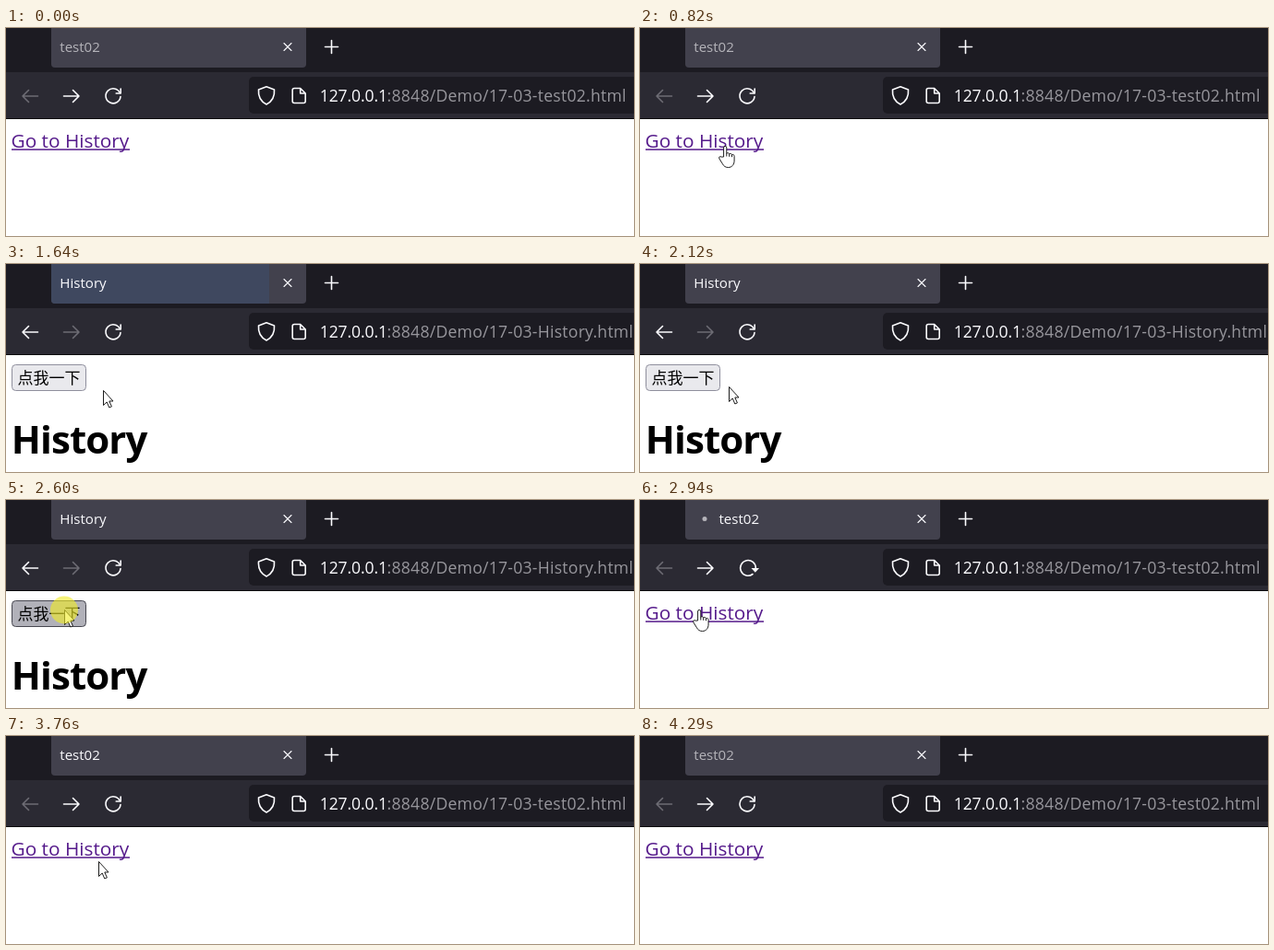
Recreate the animation shown at these times as an HTML page. Size 680 by 226 pixels, loop 4360 ms.

```html
<!DOCTYPE html>
<html lang="en">
<head>
<meta charset="utf-8">
<title>History back and forward</title>
<style>
  html, body { margin: 0; width: 100%; height: 100%; overflow: hidden; background: #fff; }
  svg { display: block; width: 680px; height: 226px; }
  text { font-family: "Open Sans", "Noto Sans", sans-serif; white-space: pre; }
  .icon { fill: none; stroke: #fbfbfe; stroke-width: 1.6; stroke-linecap: round; stroke-linejoin: round; }
  .thin { stroke-width: 1.1; }
  .url { font-size: 17.6px; }
  .cursor { fill: #fff; stroke: #111; stroke-width: .95; stroke-linejoin: round; }
</style>
</head>
<body>
<svg viewBox="0 0 680 226">
  <defs>
    <clipPath id="tabShape"><rect x="49" y="-6" width="276" height="49" rx="4"/></clipPath>
  </defs>

  <rect width="680" height="226" fill="#fff"/>
  <rect width="680" height="48" fill="#1c1b22"/>
  <rect y="48" width="680" height="50" fill="#2b2a33"/>
  <rect y="98" width="680" height="1" fill="#0c0c0d"/>

  <g clip-path="url(#tabShape)">
    <rect x="49" width="276" height="43" fill="#42414d"/>
    <rect id="burst" x="49" width="0" height="43" fill="#3f485f"/>
  </g>
  <circle id="dot" cy="20.5" r="2.5" fill="#b5b4ba"/>
  <text id="tabText" y="26" font-size="15.1" font-weight="500"></text>
  <path class="icon thin" d="M301 16.500l8 8m0-8l-8 8"/>
  <path class="icon" d="M345.500 20.500h14m-7-7v14"/>

  <path id="back" class="icon" d="M34.500 74H18m6.500-6.500L18 74l6.500 6.500"/>
  <path id="forward" class="icon" d="M62.500 74H79m-6.500-6.500L79 74l-6.500 6.500"/>
  <g id="reload">
    <path class="icon" d="M123.300 70.500A8 8 0 1 0 124 74.500"/>
    <path class="icon" d="M124.200 66v5h-5"/>
  </g>
  <g id="reloadTurn">
    <path class="icon" d="M122 80.500A8.300 8.300 0 1 1 125.300 74"/>
    <path d="M120.500 74h8.500l-4.200 4.800z" fill="#fbfbfe"/>
  </g>
  <path id="stop" class="icon" d="M110 68l12 12m0-12l-12 12"/>

  <rect x="263" y="53" width="430" height="40" rx="5" fill="#1c1b22"/>
  <path class="icon" d="M282 63.800l8.500 3.200c.6 7-1.800 12.500-8.500 16c-6.700-3.500-9.100-9-8.500-16z"/>
  <path class="icon" d="M312.200 65.500h6.500l5.500 5.500v8.500a2 2 0 0 1-2 2h-10a2 2 0 0 1-2-2v-12a2 2 0 0 1 2-2zM318.700 66v5h5"/>
  <text class="url" x="339.800" y="80" fill="#fbfbfe" letter-spacing="-.15">127.0.0.1</text>
  <text id="path" class="url" x="412.600" y="80" fill="#97969c" letter-spacing=".24"></text>

  <g id="linkPage" fill="#551a8b">
    <text x="5.500" y="130" font-size="20.8">Go to History</text>
    <rect x="6" y="131.300" width="128" height="1.500"/>
  </g>
  <g id="historyPage">
    <rect id="button" x="6.500" y="109.500" width="80" height="28" rx="4" stroke="#8f8f9d"/>
    <text x="12.500" y="130" font-size="17" lang="zh-CN"
      style="font-family:'Noto Sans CJK SC','Noto Sans CJK',sans-serif">点我一下</text>
    <text x="5.800" y="206.300" font-size="42" font-weight="700" letter-spacing="-.9">History</text>
  </g>

  <path id="arrow" class="cursor" d="M.5.500V16.500L4.200 13l2.600 6l2.600-1.100L6.800 12h4.200z"/>
  <g id="hand" class="cursor">
    <path d="M-.4 12V2a1.600 1.600 0 0 1 3.200 0v6.200c.7-.8 2.500-.6 2.900.6c.8-.7 2.400-.4 2.800.8c1-.5 2.600 0 2.600 1.700v4.700c0 4.500-2.600 7.500-6.600 7.500c-3 0-4.600-1.300-6-3.700l-3.600-5.800c-1-1.900.9-3 2.200-1.900z"/>
    <path d="M2.800 8v3.500M5.700 9v2.800M8.500 9.800v2.400" fill="none"/>
  </g>
  <circle id="press" r="15" fill="#f0eb28" fill-opacity=".62"/>
</svg>
<script>
const LOOP = 4360, STEP = 70;
const el = {};
document.querySelectorAll("[id]").forEach(n => el[n.id] = n);
const set = (id, attrs) => { for (const k in attrs) el[id].setAttribute(k, attrs[k]); };
const show = (id, on) => set(id, { visibility: on ? "visible" : "hidden" });

const linear = u => u;
const easeOut = u => 1 - (1 - u) ** 2;
const easeBoth = u => u * u * (3 - 2 * u);

// start time, number of steps, from, to, easing
const moves = [
  [260, 8, [184, 205], [91, 129], easeOut],
  [820, 1, [91, 128], [91, 128], linear],
  [1290, 2, [91, 128], [91, 126], linear],
  [1430, 4, [95, 129], [105, 137], linear],
  [2050, 6, [100, 135], [63, 119], easeBoth],
  [3300, 3, [64, 120], [67, 123], linear],
  [3760, 1, [100, 136], [100, 136], linear]
];

function pointer(t) {
  if (t < 260 || t >= 3830) return null;
  const [start, n, a, b, ease] = moves.filter(m => m[0] <= t).pop();
  const k = Math.min(n - 1, Math.floor((t - start + 10) / STEP));
  const u = n > 1 ? ease(k / (n - 1)) : 1;
  return a.map((v, i) => Math.round(v + (b[i] - v) * u));
}

function burstWidth(t) {
  if (t >= 1500 && t < 1850) return t < 1570 ? 80 : t < 1640 ? 160 : 236;
  return t >= 3010 && t < 3160 ? 208 : 0;
}

function dotX(t) {
  if (t >= 1290 && t < 1500) return t < 1370 ? 66 : t < 1430 ? 61 : 70;
  return t >= 2870 && t < 3010 ? (t < 2940 ? 61 : 70) : 0;
}

function draw(t) {
  const onHistory = t >= 1290 && t < 2870;
  const historyShown = t >= 1430 && t < 2940;
  const pressed = t >= 1220 && t < 1290 || t >= 2600 && t < 2800;
  const stopping = t >= 1290 && t < 1370 || t >= 2870 && t < 2940;
  const turning = t >= 1370 && t < 1430 || t >= 2940 && t < 3010;
  const dot = dotX(t), p = pointer(t);

  el.tabText.textContent = onHistory ? "History" : "test02";
  set("tabText", { x: dot ? 85.5 : 58.3, fill: t >= 1220 && t < 4290 ? "#fbfbfe" : "#b5b4ba" });
  set("burst", { width: burstWidth(t) });
  show("dot", dot);
  set("dot", { cx: dot });

  el.path.textContent = `:8848/Demo/17-03-${onHistory ? "History" : "test02"}.html`;
  el.back.style.stroke = onHistory ? "#fbfbfe" : "#6d6c74";
  el.forward.style.stroke = onHistory ? "#6d6c74" : "#fbfbfe";
  show("stop", stopping);
  show("reloadTurn", turning);
  show("reload", !stopping && !turning);

  show("linkPage", !historyShown);
  show("historyPage", historyShown);

  const [x, y] = p || [0, 0];
  const onButton = x < 87 && y < 138;
  set("button", { fill: !onButton ? "#e9e9ed" : pressed ? "#b1b1b9" : "#d0d0d7",
    stroke: !onButton ? "#8f8f9d" : pressed ? "#484851" : "#676774" });

  const overLink = !historyShown && y < 134 && x < 134 && !(t >= 1290 && t < 1430);
  const at = { transform: `translate(${x} ${y})` };
  set("arrow", at);
  set("hand", at);
  set("press", { cx: x, cy: y + .5 });
  show("arrow", p && !overLink);
  show("hand", p && overLink);
  show("press", p && pressed);
}

const begin = performance.now();
function tick() {
  draw((performance.now() - begin) % LOOP);
  requestAnimationFrame(tick);
}
tick();
</script>
</body>
</html>
```
